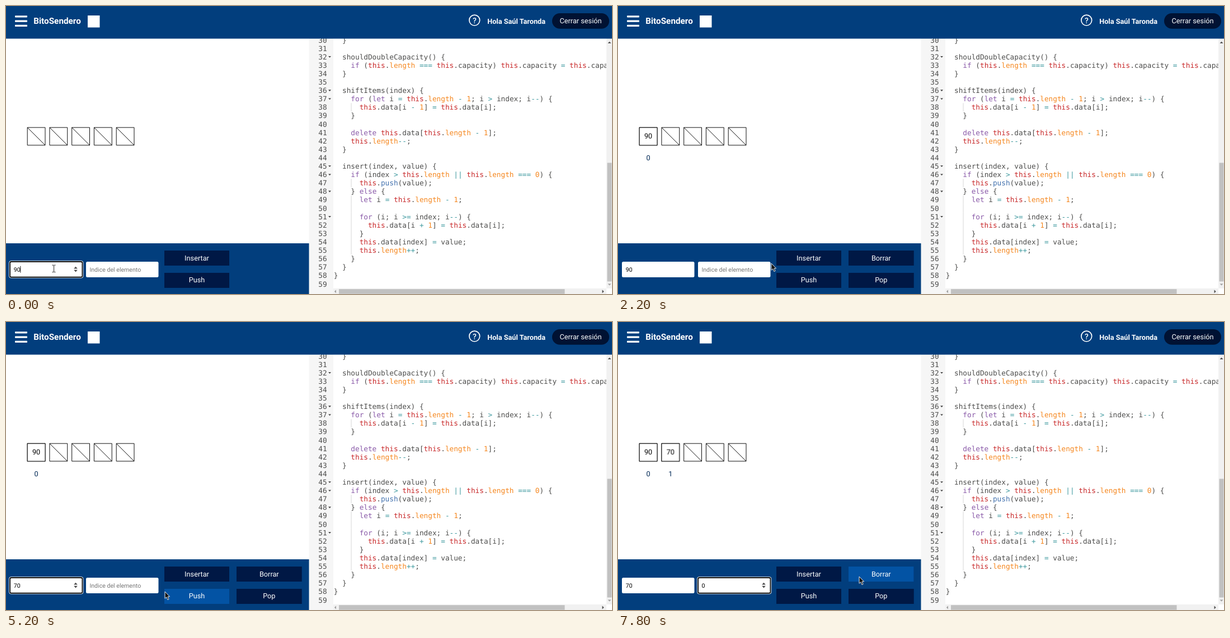
Animation, 1083 px wide and 517 px high, one loop 8000 ms. Source, as an HTML page:

```html
<!DOCTYPE html>
<html lang="es">
<head>
<meta charset="utf-8">
<title>BitoSendero</title>
<style>
html, body { margin: 0; width: 100%; height: 100%; overflow: hidden; background: #fff; }
svg { display: block; width: 100vw; height: 100vh; }
text { font: 12.72px Roboto, sans-serif; text-rendering: geometricPrecision; white-space: pre; }
.bold { font-weight: 700; fill: #fff; }
.mid { text-anchor: middle; }
.small text, text.small { font-size: 10.6px; }
.mono text { font-family: "DejaVu Sans Mono", monospace; fill: #4d4d4c; }
.mono .key { fill: #8959a8; }
.mono .self { fill: #c82829; }
.mono .num { fill: #f5871f; }
.mono .op { fill: #3e999f; }
.mono .fn { fill: #4271ae; }
.btn rect { fill: #001845; }
.btn .hot { fill: #0353a4; }
.btn text { fill: #fff; text-anchor: middle; }
.line { fill: #fff; stroke: #000; stroke-width: .95; }
.index { fill: #002855; text-anchor: middle; }

/* Everything changes in hard steps on one shared clock. */
.anim { animation: 8s step-end -8ms infinite; }
#pointer { animation-name: move; }
#beam { animation-name: beam; }
#arrow { animation-name: arrow; }
#focus1 { animation-name: focus1; }
#focus2 { animation-name: focus2; }
#spin2 { animation-name: spin2; }
#caret1 { animation-name: caret1; }
#caret2 { animation-name: caret2; }
#v90 { animation-name: v90; }
#v7 { animation-name: v7; }
#v70 { animation-name: v70; }
#hint { animation-name: hint; }
#v0 { animation-name: v0; }
#hotInsert { animation-name: hotInsert; }
#hotPush { animation-name: hotPush; }
#hotDelete { animation-name: hotDelete; }
#extra { animation-name: extra; }
#tile90 { animation-name: tile90; }
#tile70 { animation-name: tile70; }
#index0 { animation-name: index0; }
#index1 { animation-name: index1; }

@keyframes move {
  0% { transform: translate(85.5px, 471.5px); }
  6.25% { transform: translate(105px, 470px); }
  8.75% { transform: translate(205px, 466px); }
  10% { transform: translate(297px, 459px); }
  11.25% { transform: translate(325px, 456px); }
  13.75% { transform: translate(331px, 469px); }
  15% { transform: translate(333.5px, 480.5px); }
  16.25% { transform: translate(340.5px, 490.5px); }
  26.25% { transform: translate(306px, 470px); }
  27.5% { transform: translate(274px, 462px); }
  28.75% { transform: translate(236px, 461px); }
  30% { transform: translate(203px, 459px); }
  31.25% { transform: translate(190px, 469px); }
  33.75% { transform: translate(145.5px, 458.5px); }
  48.75% { transform: translate(92.5px, 468px); }
  57.5% { transform: translate(190px, 470px); }
  60% { transform: translate(264px, 472px); }
  62.5% { transform: translate(293.5px, 485px); }
  65% { transform: translate(284px, 484px); }
  67.5% { transform: translate(303px, 485px); }
  72.5% { transform: translate(233px, 466px); }
  75% { transform: translate(224.5px, 468.5px); }
  77.5%, 80% { transform: translate(224.5px, 463px); }
  95% { transform: translate(318.5px, 464px); }
  97.5%, 100% { transform: translate(431px, 457px); }
}
@keyframes beam {
  0%, 28.75%, 72.5% { opacity: 1; }
  10%, 60%, 95%, 100% { opacity: 0; }
}
@keyframes arrow {
  0%, 28.75%, 72.5% { opacity: 0; }
  10%, 60%, 95%, 100% { opacity: 1; }
}
@keyframes focus1 { 0%, 48.75% { opacity: 1; } 20%, 67.5%, 100% { opacity: 0; } }
@keyframes focus2 { 0% { opacity: 0; } 80%, 100% { opacity: 1; } }
@keyframes spin2 {
  0%, 10%, 48.75%, 62.5% { opacity: 0; }
  8.75%, 28.75%, 57.5%, 72.5%, 100% { opacity: 1; }
}
@keyframes caret1 {
  0%, 16.25%, 51.25% { opacity: 1; transform: none; }
  6.25%, 20%, 60%, 100% { opacity: 0; transform: none; }
  48.75% { opacity: 1; transform: translate(-6px); }
}
@keyframes caret2 {
  0%, 95%, 100% { opacity: 0; transform: none; }
  80% { opacity: 1; transform: none; }
  87.5% { opacity: 1; transform: translate(6px); }
}
@keyframes v90 { 0% { opacity: 1; } 48.75%, 100% { opacity: 0; } }
@keyframes v7 { 0%, 51.25%, 100% { opacity: 0; } 48.75% { opacity: 1; } }
@keyframes v70 { 0% { opacity: 0; } 51.25%, 100% { opacity: 1; } }
@keyframes hint { 0% { opacity: 1; } 87.5%, 100% { opacity: 0; } }
@keyframes v0 { 0% { opacity: 0; } 87.5%, 100% { opacity: 1; } }
@keyframes hotInsert { 0%, 13.75%, 100% { opacity: 0; } 10% { opacity: 1; } }
@keyframes hotPush { 0%, 26.25%, 72.5%, 100% { opacity: 0; } 16.25%, 62.5% { opacity: 1; } }
@keyframes hotDelete { 0% { opacity: 0; } 97.5%, 100% { opacity: 1; } }
@keyframes extra { 0% { opacity: 0; } 20%, 100% { opacity: 1; } }
@keyframes tile90 {
  0% { opacity: 0; transform: translate(-38px, -119.7px); }
  21.25% { opacity: 1; transform: translate(-30.8px, -119.7px); }
  22.5% { opacity: 1; transform: translate(-12px, -119.7px); }
  23.75% { opacity: 1; transform: translate(0, -119.7px); }
  25% { opacity: 1; transform: translate(0, -60px); }
  26.25%, 100% { opacity: 1; transform: none; }
}
@keyframes tile70 {
  0% { opacity: 0; transform: translate(-77.5px, -119.7px); }
  67.5% { opacity: 1; transform: translate(-77.5px, -119.7px); }
  70% { opacity: 1; transform: translate(0, -119.7px); }
  72.5% { opacity: 1; transform: translate(0, -.4px); }
  75%, 100% { opacity: 1; transform: none; }
}
@keyframes index0 { 0% { opacity: 0; } 27.5%, 100% { opacity: 1; } }
@keyframes index1 { 0% { opacity: 0; } 75%, 100% { opacity: 1; } }
</style>
</head>
<body>
<svg viewBox="0 0 1083 517" preserveAspectRatio="none">
  <defs>
    <path id="cell" class="line" d="M38.2 218.1h31.8v31.8h-31.8zl31.8 31.8"/>
    <rect id="box" class="line" x="38.2" y="218.1" width="31.8" height="31.8"/>
    <rect id="field" x="7" y="459" width="129.5" height="28" rx="2.5" fill="#fff"/>
    <g id="ring">
      <rect x="5.2" y="457.2" width="133.1" height="31.4" rx="4" fill="#fff"/>
      <rect x="6.1" y="458.1" width="131.3" height="29.6" rx="3.2" fill="#101010"/>
      <rect x="8" y="460" width="127.5" height="25.8" rx="1.6" fill="#fff"/>
    </g>
    <path id="spin" d="M121.2 471.4l3.3-3.6 3.3 3.6zM121.2 473.8l3.3 3.6 3.3-3.6z" fill="#4a4a4a"/>
  </defs>

  <!-- Editor -->
  <rect x="541.5" y="58" width="43.5" height="459" fill="#f6f6f6"/>
  <g id="code" class="mono"></g>
  <path d="M585 507h488v10h-488zM1073 58h10v449h-10z" fill="#f1f1f1"/>
  <rect x="1073" y="507" width="10" height="10" fill="#fff"/>
  <path d="M595 508.3h403.5v8.4h-403.5zM1074.5 281.5h8v213h-8z" fill="#c1c1c1"/>
  <path d="M1075.5 67l3-3.2 3 3.2zM1065.5 509.5l3.2 3-3.2 3z" fill="#505050"/>
  <path d="M1075.5 498.5l3 3.2 3-3.2zM590 509.5l-3.2 3 3.2 3z" fill="#a3a3a3"/>

  <!-- Header -->
  <rect width="1083" height="58.6" fill="#023e7d"/>
  <g fill="#fff">
    <rect x="16" y="17.2" width="22" height="3.2" rx=".8"/>
    <rect x="16" y="25.5" width="22" height="3.2" rx=".8"/>
    <rect x="16" y="33.8" width="22" height="3.2" rx=".8"/>
    <rect x="146" y="17" width="21.5" height="21.5"/>
  </g>
  <text class="bold" x="49.3" y="32.4" style="font-size:15.3px">BitoSendero</text>
  <circle cx="837.3" cy="25.6" r="9.4" fill="none" stroke="#fff" stroke-width="1.7"/>
  <text class="bold mid" x="837.3" y="30.6" style="font-size:14px;font-weight:500">?</text>
  <text class="bold" x="964" y="31.6" text-anchor="end">Hola Saúl Taronda</text>
  <rect x="976" y="13" width="102" height="27.8" rx="13.9" fill="#001233"/>
  <text class="mid" x="1027" y="31.2" fill="#fff">Cerrar sesión</text>

  <!-- Array -->
  <use href="#cell"/>
  <use href="#cell" x="39.75"/>
  <use href="#cell" x="79.5"/>
  <use href="#cell" x="119.25"/>
  <use href="#cell" x="159"/>
  <g id="tile90" class="anim">
    <use href="#box"/>
    <text class="mid" x="54.1" y="237.4">90</text>
  </g>
  <g id="tile70" class="anim">
    <use href="#box" x="39.75"/>
    <text class="mid" x="93.8" y="237.4">70</text>
  </g>
  <text id="index0" class="anim index" x="54.1" y="276.7">0</text>
  <text id="index1" class="anim index" x="93.8" y="276.7">1</text>

  <!-- Controls -->
  <rect y="426" width="541.5" height="91" fill="#023e7d"/>
  <g class="small">
    <use href="#field"/>
    <use href="#field" x="136"/>
    <g id="focus1" class="anim"><use href="#ring"/><use href="#spin"/></g>
    <g id="focus2" class="anim"><use href="#ring" x="136"/></g>
    <use id="spin2" class="anim" href="#spin" x="136"/>
    <text id="v90" class="anim" x="13.8" y="476.6">90</text>
    <text id="v7" class="anim" x="13.8" y="476.6">7</text>
    <text id="v70" class="anim" x="13.8" y="476.6">70</text>
    <text id="hint" class="anim" x="149.4" y="476.6" fill="#757575">Indice del elemento</text>
    <text id="v0" class="anim" x="149.6" y="476.6">0</text>
    <rect id="caret1" class="anim" x="25.4" y="466.8" width=".9" height="12"/>
    <rect id="caret2" class="anim" x="149.2" y="466.8" width=".9" height="12"/>
  </g>
  <g class="btn">
    <rect x="283" y="439" width="116" height="27"/>
    <rect id="hotInsert" class="anim hot" x="283" y="439" width="116" height="27"/>
    <text x="341" y="456.6">Insertar</text>
    <rect x="283" y="479" width="116" height="27"/>
    <rect id="hotPush" class="anim hot" x="283" y="479" width="116" height="27"/>
    <text x="341" y="496.4">Push</text>
    <g id="extra" class="anim">
      <rect x="412" y="439" width="116.7" height="27"/>
      <rect id="hotDelete" class="anim hot" x="412" y="439" width="116.7" height="27"/>
      <text x="470.3" y="456.6">Borrar</text>
      <rect x="412" y="479" width="116.7" height="27"/>
      <text x="470.3" y="496.4">Pop</text>
    </g>
  </g>

  <g id="pointer" class="anim">
    <g id="beam" class="anim" fill="none">
      <path d="M-3-6.2h2.2L0-5.4.8-6.2H3M0-5.4V5.4M-3 6.2h2.2L0 5.4.8 6.2H3" stroke="#fff" stroke-opacity=".6" stroke-width="2"/>
      <path d="M-3-6.2h2.2L0-5.4.8-6.2H3M0-5.4V5.4M-3 6.2h2.2L0 5.4.8 6.2H3" stroke="#111" stroke-width="1"/>
    </g>
    <path id="arrow" class="anim" d="M0 0V12.3L2.8 9.8 4.9 14.6 7.1 13.6 5 9H8.6Z" fill="#111" stroke="#fff" stroke-width=".9"/>
  </g>
</svg>
<script>
const source = `  }

  shouldDoubleCapacity() {
    if (this.length === this.capacity) this.capacity = this.capacity * 2;
  }

  shiftItems(index) {
    for (let i = this.length - 1; i > index; i--) {
      this.data[i - 1] = this.data[i];
    }

    delete this.data[this.length - 1];
    this.length--;
  }

  insert(index, value) {
    if (index > this.length || this.length === 0) {
      this.push(value);
    } else {
      let i = this.length - 1;

      for (i; i >= index; i--) {
        this.data[i + 1] = this.data[i];
      }
      this.data[index] = value;
      this.length++;
    }
  }
}
`;
const first = 30, left = 585.7, col = 7.658, row = 15.105;
const folds = [32, 36, 37, 45, 46, 48, 51];
const hasGuide = n => n === 38 || n === 47 || (n > 48 && n < 56);
const rules = [
  [/^(if|for|let|else|delete)$/, 'key'],
  [/^this$/, 'self'],
  [/^(length|\d+)$/, 'num'],
  [/^push$/, 'fn'],
  [/^[=<>|+*-]+$/, 'op']
];
const code = document.getElementById('code');

function add(parent, name, attrs, text = '') {
  const el = document.createElementNS('http://www.w3.org/2000/svg', name);
  for (const key in attrs) el.setAttribute(key, attrs[key]);
  el.textContent = text;
  return parent.appendChild(el);
}

source.split('\n').forEach((line, i) => {
  const n = first + i, y = 65.5 + i * row;
  add(code, 'text', { x: 573.6, y, 'text-anchor': 'end' }, n);
  if (folds.includes(n)) add(code, 'path', { d: `M576 ${y - 5.8}h5l-2.5 2.8z`, fill: '#444' });
  if (hasGuide(n)) add(code, 'rect', { x: 616.6, y: y - 12.1, width: .8, height: row, fill: '#ccc' });
  const body = line.trimStart();
  const text = add(code, 'text', { x: left + (line.length - body.length) * col, y });
  for (const part of body.split(/(\w+|[=<>|+*-]+)/)) {
    if (!part) continue;
    const rule = rules.find(([test]) => test.test(part));
    add(text, 'tspan', rule ? { class: rule[1] } : {}, part);
  }
});
</script>
</body>
</html>
```
